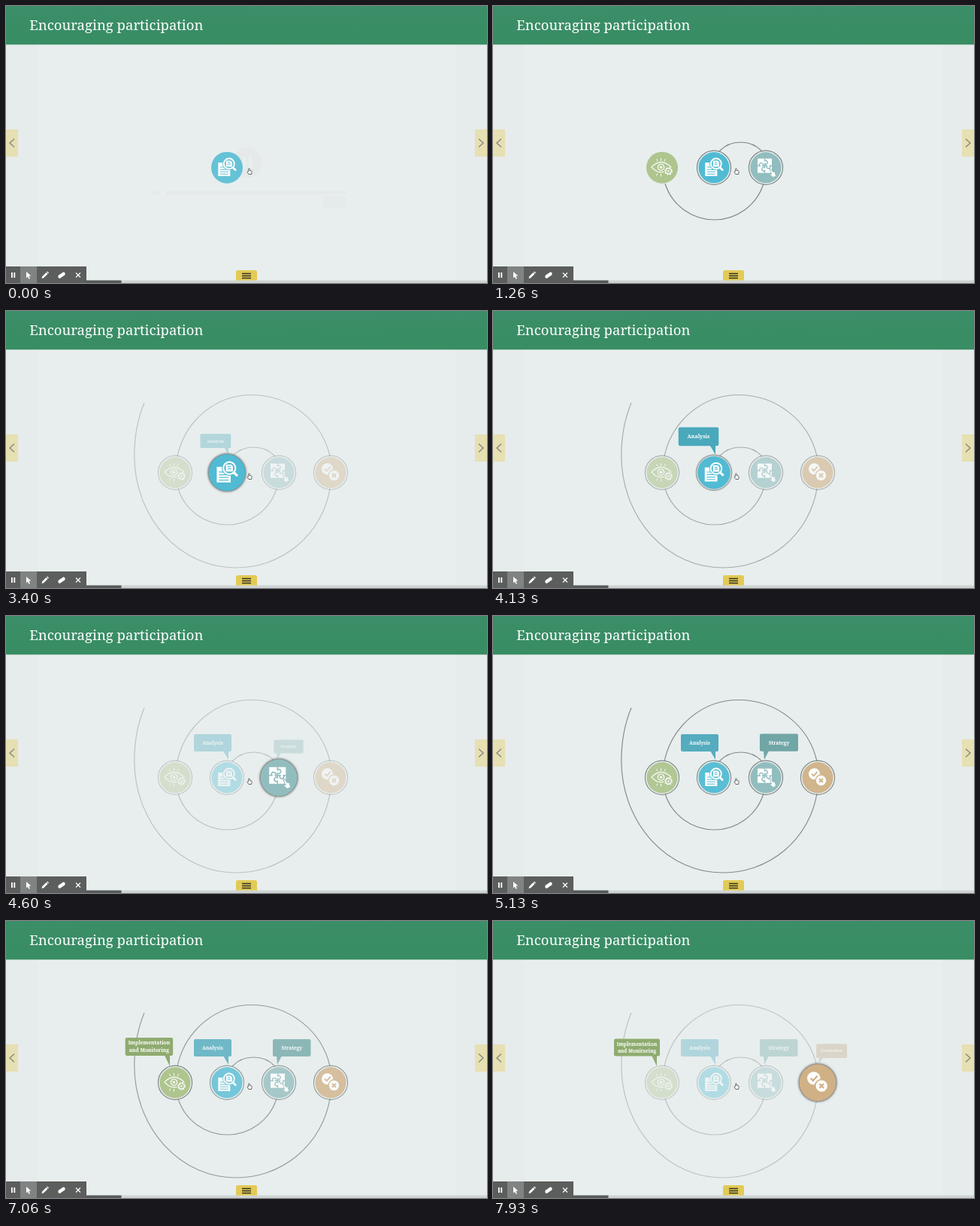
Write an HTML page that moves like this. It is 640 px wide and 368 px high and loops after 8000 ms.

```html
<!DOCTYPE html>
<html lang="en">
<head>
<meta charset="utf-8">
<title>Encouraging participation</title>
<style>
html, body { margin: 0; width: 100%; height: 100%; overflow: hidden; background: #e8eeee; }
svg { display: block; width: 640px; height: 368px; font-family: "Noto Serif", serif; }
.line { fill: none; stroke: #7d8584; stroke-width: 1.15; }
.shade { fill: #555; filter: blur(1.5px); }
.white { fill: none; stroke: #fff; stroke-width: 1.2; }
.tint { fill: none; stroke: currentColor; stroke-width: 1.1; }
.label text { fill: #fff; font-size: 6.5px; font-weight: bold; text-anchor: middle; }
</style>
</head>
<body>
<svg viewBox="0 0 640 368">
  <defs>
    <linearGradient id="green" x2="0" y2="1">
      <stop stop-color="#3b8e68"/><stop offset="1" stop-color="#388d63"/>
    </linearGradient>
  </defs>
  <rect width="640" height="368" fill="#e6eceb"/>
  <rect x="42" width="556" height="368" fill="#e8eeee"/>
  <rect width="640" height="51.300" fill="url(#green)"/>
  <text x="31.300" y="32" font-size="18.500" fill="#fff">Encouraging participation</text>

  <g id="player" fill="#dfe0e0">
    <circle cx="321" cy="208" r="20"/>
    <path d="M195 246h257v4h-257z"/>
    <rect x="421" y="253" width="32" height="16" rx="6"/>
    <path d="M315 200h4v16h-4zM323 200h4v16h-4z" fill="#ecf0f0"/>
    <circle cx="209" cy="248" r="3" fill="#f2f4f4"/>
  </g>

  <g id="arcs" class="line"></g>
  <g id="items"></g>
  <g id="labels"></g>

  <path d="M0 164h16v36h-16zM624 164h16v36h-16z" fill="#e6e0b2"/>
  <path d="M11 176.500l-6 5.500 6 5.500M629 176.500l6 5.500-6 5.500" fill="none" stroke="#85877a" stroke-width="1.3"/>
  <path d="M0 364.500h640v3.500h-640z" fill="#ced4d2"/>
  <path d="M0 364.500h153.500v3.500h-153.500z" fill="#545b58"/>
  <path d="M306 364.500v-11q0-2.500 2.500-2.500h23q2.500 0 2.500 2.500v11z" fill="#e2ca55"/>
  <path d="M314 355.500h12M314 358.500h12M314 361.500h12" stroke="#353422" stroke-width="1.4"/>

  <path d="M0 346h107v22h-107z" fill="#5b5e5c"/>
  <path d="M19 346h22v22h-22z" fill="#7f8381"/>
  <g fill="#fff">
    <path d="M7 354h1.800v7h-1.800zM10.400 354h1.800v7h-1.800z"/>
    <path d="M27 353l6.300 5.500-3 .3 1.700 3.200-1.500.8-1.600-3.300-1.900 1.900z"/>
    <path d="M47.500 362l.7-2.700 5.300-5.300 2 2-5.300 5.300zM54.100 353.400l.9-.9 2 2-.9.900z"/>
    <path d="M69.500 358l7-4.800 2 1.200v2.800l-7 4.800-2-1z"/>
    <path d="M93 354.500l6 6m0-6l-6 6" stroke="#fff" stroke-width="1.2"/>
  </g>
  <path d="M322.700 220v-3.700q.8-1 1.500 0v2.200l2.300.5q.8.300.7 1.200l-.6 3.300h-3.700l-2-3q.5-1 1.800-.5z" fill="#fff" stroke="#444" stroke-width=".8"/>
</svg>
<script>
const LOOP = 8000, DIM = .65, LAG = 140;
const ramp = (t, a, b) => Math.min(1, Math.max(0, (t - a) / (b - a)));
const $ = id => document.getElementById(id);

const icons = {
  report: `<g transform="translate(-.7 .3)"><path d="M-11-7h10l6 6v12h-16z" fill="#fff"/>
    <path class="tint" d="M-8.500-1h6M-8.500 2.300h11M-8.500 5.300h11M-8.500 8.300h11"/>
    <path d="M8 0l5 4.500" stroke="currentColor" stroke-width="5"/>
    <circle cx="3.500" cy="-5.500" r="8.800" fill="currentColor"/>
    <circle class="white" cx="3.500" cy="-5.500" r="7" style="stroke-width:1.900"/>
    <path d="M8.500-.5l4.300 4" class="white" style="stroke-width:2.800"/>
    <path d="M-.5-9.500h6l2 2v6h-8z" fill="#fff"/>
    <path class="tint" d="M1.500-7h3.500M1.500-4.700h4"/></g>`,
  puzzle: `<path d="M-11-12h19v19h-19z" fill="#fff"/>
    <path class="tint" style="stroke-width:1.400" d="M-1.500-12v3a2.400 2.400 0 1 1 0 4v5a2.400 2.400 0 1 0 0 4v3M-11-2.500h3a2.400 2.400 0 1 1 4 0h5.500a2.400 2.400 0 1 0 4 0h2.500"/>
    <path d="M5 2q1.500-1 2.500.5l1.700 3 2.800.3 1.500 5.200-3.800 2-4-3.500q0-1.500 2-1z" fill="#fff" stroke="currentColor"/>`,
  eye: `<path class="white" d="M-14-.5Q-1.500-14 12-.5Q-1.500 13-14-.5z"/>
    <circle class="white" cx="-1.500" cy="-.5" r="4.200"/><circle cx="-1.500" cy="-.5" r="1.800" fill="#fff"/>
    <path class="white" style="stroke-width:1" d="M-1.500-9v-3.500M-6-8.500l-1.500-3M3-8.500l1.500-3M-1.500 8.300v3.500M-6 7.800l-1.500 3"/>
    <circle cx="8.500" cy="4.700" r="6" fill="currentColor"/>
    <circle class="white" cx="8.500" cy="4.700" r="4.800" stroke-dasharray="1.900 1.870"/>
    <circle class="white" cx="8.500" cy="4.700" r="3.700"/><circle cx="8.500" cy="4.700" r="1.200" fill="#fff"/>`,
  votes: `<circle cx="-4.500" cy="-5" r="7.500" fill="#fff"/>
    <path class="tint" style="stroke-width:1.900" d="M-8-5l2.700 2.700 5-5.500"/>
    <circle cx="4.500" cy="3.800" r="7.400" fill="#fff" stroke="currentColor" stroke-width="1.500"/>
    <path class="tint" style="stroke-width:2" d="M2 1.300l5 5m0-5l-5 5"/>`
};

// show: disc fade, ring: outline drawing, focus: rise and fall, tag: label pop
const items = [
  { x: 294, color: '#50bbd3', icon: 'report', show: [-850, 150], ring: [200, 400],
    focus: [2900, 3200, 3850, 4250], tag: [3300, 3600],
    text: ['Analysis'], fill: '#4aa8bb', box: [250, 157, 50, 23], tip: [296, 191] },
  { x: 363, color: '#92bdbe', icon: 'puzzle', show: [580, 730], ring: [730, 900],
    focus: [4380, 4580, 4740, 5020], tag: [4550, 4750],
    text: ['Strategy'], fill: '#70a6a6', box: [355, 157, 50.5, 23], tip: [361, 191] },
  { x: 225, color: '#aec58e', icon: 'eye', show: [1100, 1250], ring: [1270, 1470],
    focus: [5400, 5650, 6700, 7050], tag: [5700, 5950],
    text: ['Implementation', 'and Monitoring'], fill: '#8fab70', box: [161, 156.5, 61, 23], tip: [218, 193] },
  { x: 432, color: '#d0b186', icon: 'votes', show: [1820, 1980], ring: [1980, 2140],
    focus: [7400, 7700, 9000, 9400], tag: [7850, 8100],
    text: ['Evaluation'], fill: '#bfa27c', box: [429.5, 157, 50.5, 23], tip: [433, 190] }
];
const arcs = [
  { d: 'M301 193C316 177 343 177 358 193', span: [380, 620] },
  { d: 'M360 236A68.700 68.700 0 0 1 229 236', span: [860, 1180] },
  { d: 'M228 193A101 104 0 0 1 326.500 111.500A107 104 0 0 1 431 193', span: [1430, 1850] },
  { d: 'M431 236A126 126 0 0 1 305 341A134.200 149 0 0 1 170.800 192Q170.800 154 184 122', span: [2100, 2630] }
];

$('arcs').innerHTML = arcs.map(a => `<path d="${a.d}" pathLength="1"/>`).join('');
$('items').innerHTML = items.map(i => `<g color="${i.color}">
  <circle class="shade" r="21.700"/><circle class="line" r="22.600" pathLength="1"/>
  <circle r="21" fill="currentColor"/><g>${icons[i.icon]}</g></g>`).join('');
$('labels').innerHTML = items.map(({ text, fill, box: [x, y, w, h], tip }) => {
  const base = tip[0] > x + w / 2 ? x + w - 11 : x + 5;
  const lines = text.map((s, n) =>
    `<text x="${x + w / 2}" y="${y + h / 2 + 2.3 + (n - (text.length - 1) / 2) * 9.5}">${s}</text>`);
  return `<g class="label"><rect x="${x}" y="${y}" width="${w}" height="${h}" rx="2" fill="${fill}"/>
    <path d="M${base} ${y + h - 1}h7L${tip}z" fill="${fill}"/>${lines.join('')}</g>`;
}).join('');

const fade = (el, v) => el.setAttribute('opacity', v);
const trace = (el, v) => el.setAttribute('stroke-dasharray', v + ' 2');

function draw(t) {
  // discs shrink back a little before the rest brightens again
  const level = lag => items.map(({ focus: [a, b, c, d] }) => ramp(t, a, b) - ramp(t, c + lag, d + lag));
  const grow = level(0), focus = level(LAG);
  fade($('player'), .3 * (1 - ramp(t, 0, 120)));
  fade($('arcs'), 1 - DIM * .9 * Math.max(...focus));
  arcs.forEach((a, n) => trace($('arcs').children[n], ramp(t, ...a.span)));

  items.forEach((item, n) => {
    const f = grow[n], others = Math.max(...focus.filter((_, k) => k !== n));
    const dim = 1 - DIM * others;
    const g = $('items').children[n], [shade, ring, disc] = g.children;
    const ringed = ramp(t, ...item.ring);
    g.setAttribute('transform', `translate(${item.x} 214.700) scale(${1 + .16 * f})`);
    fade(g, ramp(t, ...item.show) * dim);
    fade(shade, f);
    fade(ring, 1 - f);
    trace(ring, ringed);
    disc.setAttribute('r', 21 - .4 * ringed * (1 - f));

    const p = ramp(t, ...item.tag), [x, y] = item.tip, label = $('labels').children[n];
    const size = (.6 + .4 * p) * (1 + .11 * focus[n]);
    label.setAttribute('transform', `translate(${x} ${y}) scale(${size}) translate(${-x} ${-y})`);
    fade(label, p * (item.icon === 'eye' ? 1 : dim));
  });
}

function tick() {
  draw(performance.now() % LOOP);
  requestAnimationFrame(tick);
}
tick();
</script>
</body>
</html>
```
